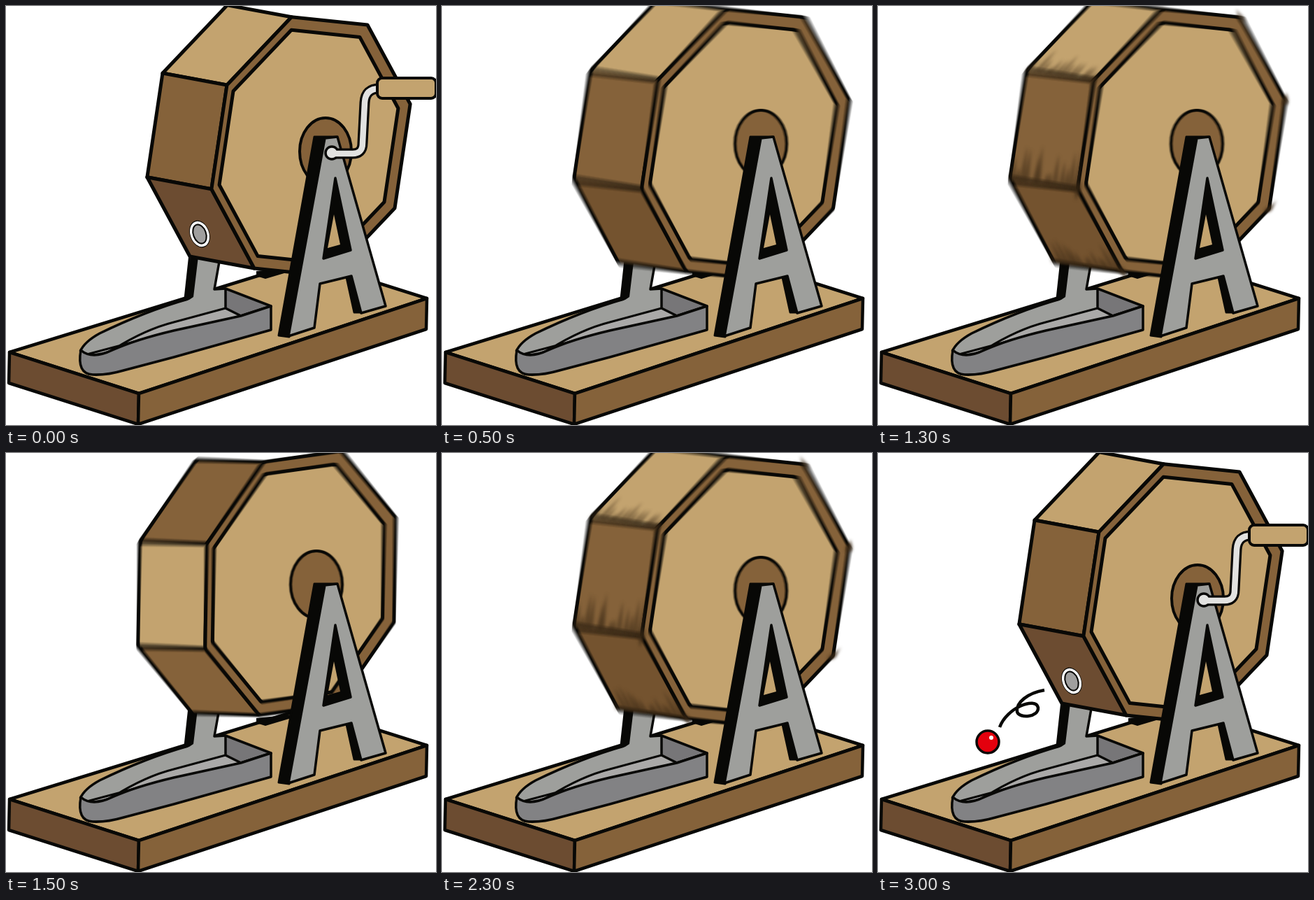
Recreate the animation shown at these times as an HTML page with a canvas. Size 615 by 599 pixels, loop 3500 ms.

```html
<!DOCTYPE html>
<html lang="en">
<head>
<meta charset="utf-8">
<title>Lottery drum</title>
<style>
html, body { margin: 0; width: 100%; height: 100%; overflow: hidden; background: #fff; }
canvas { display: block; width: 615px; height: 599px; }
</style>
</head>
<body>
<canvas id="stage" width="615" height="599"></canvas>
<script>
const W = 615, H = 599;
const TAN = '#c3a36f', BROWN = '#85623a', DARK = '#6c4c31', INK = '#080806', GREY = '#9e9f9c';
const stage = document.getElementById('stage').getContext('2d');
const scratchCanvas = document.createElement('canvas');
scratchCanvas.width = W;
scratchCanvas.height = H;
const scratch = scratchCanvas.getContext('2d');
let ctx = stage;

const add = (a, b, k = 1) => [a[0] + b[0] * k, a[1] + b[1] * k];
const mix = (a, b, t) => [a[0] + (b[0] - a[0]) * t, a[1] + (b[1] - a[1]) * t];

function path(d, fill, width, ink = INK) {
  const shape = new Path2D(d);
  if (fill) { ctx.fillStyle = fill; ctx.fill(shape, 'evenodd'); }
  if (width) { ctx.strokeStyle = ink; ctx.lineWidth = width; ctx.stroke(shape); }
}

function poly(points, fill, width) {
  path('M' + points.join(' L') + ' Z', fill, width);
}

function ellipse(x, y, rx, ry, turn, fill, width, ink = INK) {
  ctx.beginPath();
  ctx.ellipse(x, y, rx, ry, turn, 0, Math.PI * 2);
  if (fill) { ctx.fillStyle = fill; ctx.fill(); }
  if (width) { ctx.strokeStyle = ink; ctx.lineWidth = width; ctx.stroke(); }
}

function drawBase() {
  ctx.fillStyle = '#fff';
  ctx.fillRect(0, 0, W, H);
  ctx.lineJoin = 'round';
  const left = [5, 495], near = [190, 554], right = [602, 418], far = [431, 364];
  const thick = [-1, 44];
  poly([left, far, right, near], TAN, 4.5);
  poly([left, near, add(near, thick), add(left, thick)], DARK, 4.5);
  poly([near, right, add(right, thick), add(near, thick)], BROWN, 4.5);
  path('M358 379 V386 L371 390 L408 379 V374 Z', INK);
  drawTray();
}

function drawTray() {
  path('M263 350 H278 L268 418 L255 423 Z', INK, 2);
  // rear leg and far wall
  path('M276 350 L306 360 L298 405 L314 404 V433 L240 470 L125 503 L106 494'
    + ' Q112 480 134 468 Q200 436 262 420 L268 416 Z', GREY);
  path('M306 360 L298 405 L314 404 M106 494 Q112 480 134 468 Q200 436 260 419', null, 3.5);
  path('M112 499 Q138 500 155 490 Q200 462 240 452 L314 432 L338 443 L240 465 Z', '#aaa9a8', 3);
  path('M314 404 L379 429 L336 443 L314 432 Z', '#777678', 3.5);
  // near wall
  path('M379 429 L336 443 L240 464 Q185 477 152 492 Q123 506 107 492'
    + ' Q101 526 124 527 Q144 528 168 521 L240 502 L379 463 Z', '#828284', 3.5);
}

// Half-diameters of the drum face as seen in perspective, a quarter turn apart
const AXIS_A = [-120, -88], AXIS_B = [81, -174];

const still = {
  center: [436, 201], size: 1, phase: 0, depth: [-92, -17],
  faces: [TAN, BROWN, DARK], hub: [457, 208]
};
const swung = {
  center: [434, 198], size: 1.045, phase: 0, depth: [-97, -13],
  faces: [TAN, BROWN, '#74532f'], hub: [456, 197]
};
const turned = {
  center: [421, 186], size: 1.01, phase: -0.18, depth: [-96, -3],
  faces: [BROWN, TAN, BROWN], hub: [444, 188]
};

function octagon({ center, size, phase }, scale = 1) {
  return Array.from({ length: 8 }, (_, k) => {
    const angle = phase + k * Math.PI / 4;
    const spoke = add(add([0, 0], AXIS_A, Math.cos(angle)), AXIS_B, Math.sin(angle));
    return add(center, spoke, size * scale);
  });
}

// Visible edges across the drum's width, from the top down
function crossEdges(drum) {
  const front = octagon(drum);
  return [1, 0, 7, 6].map(k => [add(front[k], drum.depth), front[k]]);
}

function drawDrum(drum) {
  const edges = crossEdges(drum);
  drum.faces.forEach((fill, i) => {
    const [a, b] = edges[i], [c, d] = edges[i + 1];
    poly([a, b, d, c], fill, 5);
  });
  poly(octagon(drum), BROWN, 5);
  poly(octagon(drum, 0.9).map(p => add(p, [-3, 0])), TAN, 5);
  ellipse(...drum.hub, 37, 48, 0, BROWN, 4);
}

function drawStand() {
  path('M441 187 H473 L456 196 L405 473 L390 471 Z', INK, 3);
  path('M487 388 L498 438 L509 438 L496 386 Z', INK, 3);
  path('M456 189 L474 187 L543 429 L508 439 L494 386 L449 397 L441 460 L404 472 Z'
    + ' M471 246 L454 361 L493 349 Z', GREY, 3.5);
  // thickness seen through the opening
  path('M471 246 L454 361 L493 349 Z M469 298 L460 346 L478 341 Z', INK);
}

function drawCrank() {
  const tube = 'M466 211 H494 Q510 212 510 196 L513 138 Q514 118 534 118';
  path(tube, null, 15);
  ellipse(466, 210, 9, 9, 0, '#e2e2e0', 3.5);
  path(tube, null, 8.5, '#e2e2e0');
  ctx.beginPath();
  ctx.roundRect(531, 103, 84, 29, 7);
  ctx.fillStyle = TAN;
  ctx.fill();
  ctx.strokeStyle = INK;
  ctx.lineWidth = 4;
  ctx.stroke();
}

function drawHole() {
  ellipse(277, 326, 14, 20, -0.35, INK);
  ellipse(277, 326, 11.5, 17, -0.35, '#a09f9e', 3.5, '#fff');
  ellipse(277, 326, 9, 14, -0.35, null, 2);
}

function drawBall() {
  path('M238 339 C214 343 197 357 199 370 C202 380 230 378 229 364'
    + ' C226 348 184 364 174 392', null, 4.5);
  ellipse(157, 413, 16, 16, 0, '#e3000d', 3.5);
  ellipse(162, 407, 3, 3, 0, '#fff');
}

function random(seed) {
  const v = Math.sin(seed * 127.1) * 43758.5453;
  return v - Math.floor(v);
}

// Tapered smears that start along a-b and follow the given direction
function smear([a, b], direction, count, seed) {
  for (let i = 0; i < count; i++) {
    const foot = mix(a, b, (i + random(seed + i)) / count);
    const tip = add(foot, direction, 0.1 + 0.25 * random(seed + i * 3));
    poly([add(foot, [-5, 0]), tip, add(foot, [5, 0])], 'rgba(60,42,22,.5)');
  }
}

function drawSmears(drum) {
  ctx.save();
  ctx.filter = 'blur(2px)';
  const edges = crossEdges(drum);
  edges.slice(1).forEach((edge, i) => {
    smear(edge, add(edges[i][0], edge[0], -1), 13, i * 50 + 1);
  });
  const rim = octagon(drum);
  rim.forEach((p, k) => {
    const next = rim[(k + 1) % 8];
    smear([p, mix(p, next, 0.06)], add(p, next, -1).map(v => v * 0.4), 3, k * 20 + 7);
  });
  ctx.restore();
}

// Averages poses rotated slightly around a point below the hub
function drawSpinning(drum, spread) {
  const samples = 14, [px, py] = add(drum.hub, [5, 65]);
  for (let i = 0; i < samples; i++) {
    ctx = scratch;
    drawBase();
    ctx.save();
    ctx.filter = 'blur(0.7px)';
    ctx.translate(px, py);
    ctx.rotate((i / (samples - 1) - 0.5) * spread);
    ctx.translate(-px, -py);
    drawDrum(drum);
    ctx.restore();
    stage.globalAlpha = 1 / (i + 1);
    stage.drawImage(scratchCanvas, 0, 0);
  }
  stage.globalAlpha = 1;
  ctx = stage;
  ctx.lineJoin = 'round';
}

function drawStill(withBall) {
  drawBase();
  drawDrum(still);
  drawHole();
  drawStand();
  drawCrank();
  if (withBall) drawBall();
}

function drawMoving(drum, spread, smeared) {
  drawSpinning(drum, spread);
  if (smeared) drawSmears(drum);
  drawStand();
}

const swing = () => drawMoving(swung, 0.05, false);
const rush = () => drawMoving(swung, 0.05, true);
const turn = () => drawMoving(turned, 0.035, false);
const steps = [() => drawStill(false), swing, rush, turn, rush, swing, () => drawStill(true)];

let shown = -1;
function tick() {
  const step = Math.floor(performance.now() % 3500 / 500);
  if (step !== shown) {
    steps[step]();
    shown = step;
  }
  requestAnimationFrame(tick);
}
tick();
</script>
</body>
</html>
```
